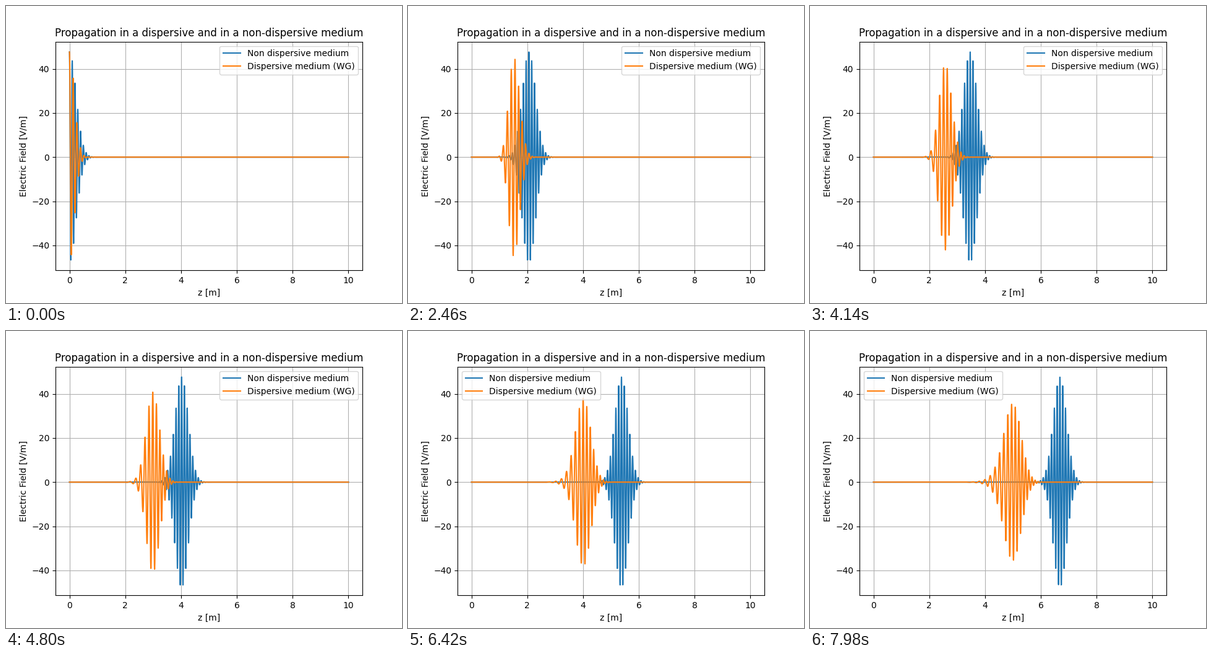
Animation, 640 px wide and 480 px high, one loop 8000 ms. Source, as a matplotlib script:

```python
import numpy as np
import matplotlib.pyplot as plt
from matplotlib.animation import FuncAnimation

C = 3e8            # speed of light
F0 = 3e9           # carrier frequency
SIGMA = 2e8        # spectral width of the pulse
CUTOFF = 2e9       # waveguide cutoff frequency
LENGTH = 10.0
FRAMES = 134
LOOP_MS = 8000

z = np.linspace(0, LENGTH, 4001)
times = np.linspace(0, LENGTH / C, 200)[:FRAMES]

freq = np.linspace(2e9, 4e9, 191)
omega = 2 * np.pi * freq
weight = np.exp(-((freq - F0) / SIGMA) ** 2 / 2)

k_free = omega / C
k_guide = 2 * np.pi / C * np.sqrt(freq ** 2 - CUTOFF ** 2)
modes_free = np.exp(1j * np.outer(z, k_free))
modes_guide = np.exp(1j * np.outer(z, k_guide))


def field(modes, t):
    """Sum of all spectral components at time t."""
    return (modes @ (weight * np.exp(-1j * omega * t))).real


fig, ax = plt.subplots(figsize=(6.4, 4.8), dpi=100)
line_free, = ax.plot(z, field(modes_free, 0), label="Non dispersive medium")
line_guide, = ax.plot(z, field(modes_guide, 0), label="Dispersive medium (WG)")
ax.set_title("Propagation in a dispersive and in a non-dispersive medium")
ax.set_xlabel("z [m]")
ax.set_ylabel("Electric Field [V/m]")
ax.grid(True)
ax.legend(loc="best")


def update(i):
    t = times[i]
    line_free.set_ydata(field(modes_free, t))
    line_guide.set_ydata(field(modes_guide, t))
    return line_free, line_guide


anim = FuncAnimation(fig, update, frames=FRAMES, interval=LOOP_MS / FRAMES,
                     repeat=True, repeat_delay=0)
plt.show()
```
